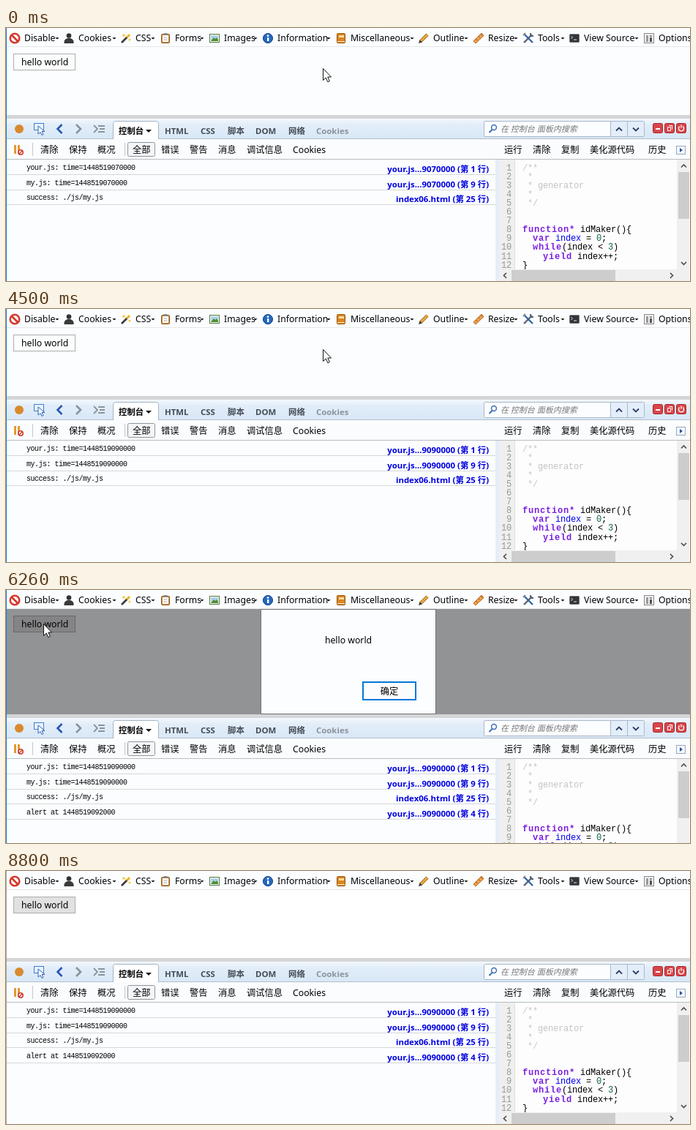
These frames come from a looping animation (935 px wide and 346 px high, 8.9 s). An HTML page:

```html
<!DOCTYPE html>
<html lang="zh">
<head>
<meta charset="utf-8">
<title>Console demo</title>
<style>
html, body { margin: 0; width: 100%; height: 100%; overflow: hidden; background: #fff; }
svg { display: block; width: 935px; height: 346px; }
text { font: 12.25px "Noto Sans", "Noto Sans CJK SC", "Noto Sans CJK", sans-serif; fill: #000; white-space: pre; }
.tab { font-size: 11.4px; font-weight: 700; fill: #454c56; }
.link { font-size: 11.4px; font-weight: 700; fill: #0000e0; text-anchor: end; }
.hint { font-size: 11px; font-style: italic; fill: #777; }
.log { font: 10px "Liberation Mono", monospace; letter-spacing: -.5px; }
.code, .num { font: 12px "Liberation Mono", monospace; letter-spacing: -.2px; }
.num { fill: #999; text-anchor: end; }
.com { fill: #c4c4c4; }
.key { font-weight: 700; letter-spacing: .8px; fill: #7a1fe0; }
.def { fill: #0000f0; }
.lit { fill: #116644; }
.mid { text-anchor: middle; }
</style>
</head>
<body>
<svg id="stage" viewBox="0 0 935 346"></svg>
<script>
const LOOP = 8900;
const PANEL_SHIFT = 51;

const rect = (x, y, w, h, fill, more = '') =>
  `<rect x="${x}" y="${y}" width="${w}" height="${h}" fill="${fill}" ${more}/>`;
const frame = (x, y, w, h, fill, stroke, rx = 0) =>
  rect(x + .5, y + .5, w - 1, h - 1, fill, `stroke="${stroke}" rx="${rx}"`);
const path = (d, fill, stroke = 'none', width = 1) =>
  `<path d="${d}" fill="${fill}" stroke="${stroke}" stroke-width="${width}"/>`;
const line = (d, stroke, width = 1) => path(d, 'none', stroke, width);
const circle = (x, y, r, fill, stroke = 'none', width = 1) =>
  `<circle cx="${x}" cy="${y}" r="${r}" fill="${fill}" stroke="${stroke}" stroke-width="${width}"/>`;
const text = (x, y, s, cls = '', more = '') =>
  `<text x="${x}" y="${y}" class="${cls}" ${more}>${s.replace(/</g, '&lt;')}</text>`;
const group = (id, body) => `<g id="${id}">${body}</g>`;
const at = (x, y, body) => `<g transform="translate(${x} ${y})">${body}</g>`;
const down = (x, y, r, fill) => path(`M${x - r} ${y}h${2 * r}l${-r} ${r}z`, fill);

// Menu icons, drawn around their own centre
const pencil = (body, tip) =>
  line('M-4 4L5 -5', '#8a5a18', 4.5) + line('M-4 4L5 -5', body, 2.8) + path('M-7 7l1.5-5 3.500 3.500z', tip);
const icons = {
  disable: circle(0, 0, 6.3, '#fff', '#d3392b', 2.6) + line('M-4.500 -4.500L4.500 4.500', '#d3392b', 2.6),
  person: circle(0, -3.500, 3.300, '#333') + path('M-6.500 7V4.500Q-6 1 -2 0h4Q6 1 6.500 4.500V7z', '#3a3a3a'),
  wand: line('M-6 6L2 -2', '#3b3b3b', 2.6) + line('M1 -1L5 -5', '#e8b520', 3) +
    circle(-3, -4, 1.8, '#f3c93c') + circle(5, 2, 1.5, '#f3c93c'),
  form: frame(-6, -6, 12, 13, '#d08a3c', '#8e5a22', 1) + rect(-4, -4, 8, 9, '#fff') +
    rect(-2.500, -7, 5, 3, '#888') + line('M-2.500 -1h5M-2.500 2h5', '#aaa'),
  image: frame(-7, -6, 14, 12, '#fff', '#56743a') + rect(-5, -4, 10, 8, '#a9d3ea') +
    path('M-5 4l4-5 2 2 2-2 2 3v2z', '#4b8c2d'),
  info: circle(0, 0, 6.6, '#2467bd', '#174b91') + rect(-1, -1, 2.4, 5, '#fff') + circle(0, -3.400, 1.4, '#fff'),
  book: frame(-6, -7, 12, 14, '#d98520', '#9a5510', 1) + rect(-3, -4, 7, 3, '#f8dba0') + line('M-5 4.500h10', '#fff0cc'),
  pencil: pencil('#f2a93b', '#3c3c3c'),
  ruler: path('M-7 4L4 -7L7 -3.500L-4 7z', '#eca24e', '#b5651d') + line('M-3.500 1l2 2M0 -2.500l2 2M3 -5.500l2 2', '#8a4b12'),
  tools: line('M-6 6L5 -5', '#5b6674', 2.4) + line('M-6 -6L6 6', '#3566a8', 2.4) +
    line('M3 -7v4h4', '#5b6674', 2) + line('M-7 -4l3-3', '#888', 2),
  screen: frame(-7, -6, 14, 12, '#30363c', '#777', 1) + line('M-4.500 -3l2 2 -2 2M-1 2h4', '#e5e5e5'),
  options: frame(-7, -7, 14, 14, '#f0f0f0', '#888') + rect(-4, -4, 3, 9, '#9a9a9a') +
    rect(1, -1, 3, 6, '#555') + rect(1, -4, 3, 2, '#888')
};
const menu = [
  ['Disable', 25, 70, 'disable'], ['Cookies', 99, 148, 'person'], ['CSS', 177, 201, 'wand'],
  ['Forms', 231, 268, 'form'], ['Images', 298, 341, 'image'], ['Information', 371, 441, 'info'],
  ['Miscellaneous', 471, 555, 'book'], ['Outline', 584, 629, 'pencil'], ['Resize', 659, 697, 'ruler'],
  ['Tools', 727, 761, 'tools'], ['View Source', 790, 862, 'screen'], ['Options', 892, 945, 'options']
];

function menuBar() {
  return rect(0, 0, 935, 26, '#fcfdff') + rect(0, 25, 935, 1, '#e4e6e8') +
    menu.map(([label, x, arrow, icon]) =>
      at(x - 13, 14, icons[icon]) + text(x, 18, label) + down(arrow, 13, 2.5, '#111')).join('');
}

function tabBar() {
  const tabs = [['HTML', 217], ['CSS', 266], ['脚本', 303], ['DOM', 341], ['网络', 386]];
  const red = x => frame(x, 130, 14, 14, '#d9464a', '#a8262c', 2);
  return rect(0, 119, 935, 5, '#d4d5d7') + rect(0, 124, 935, 28, 'url(#bar)') + rect(0, 151, 935, 1, '#b4c0cc') +
    circle(18, 138, 6, '#d98a2e') +
    frame(38, 130, 14, 10, '#e8f2fd', '#3f7fd0') +
    path('M44 134v11l3-2.500 2 4 2-1-2-4h4z', '#fff', '#2a62b8') +
    line('M76.500 132l-6 6 6 6', '#2858b4', 2.6) + line('M96 132l6 6-6 6', '#8b929a', 2.6) +
    line('M120 133l5 5-5 5M126 134h9M128 138h7M126 142h9', '#8b929a', 1.8) +
    path('M146.500 152V130.500q0-3 3-3h56q3 0 3 3V152', '#fff', '#a5b5c6') +
    text(154, 145, '控制台', 'tab', 'style="fill:#000"') + down(195, 139, 4, '#111') +
    tabs.map(([s, x]) => text(x, 145, s, 'tab')).join('') +
    text(424, 145, 'Cookies', 'tab', 'style="fill:#8b939c"') +
    frame(653, 127, 220, 22, '#fbfdff', '#a9b8c8', 1) +
    rect(827, 128, 45, 20, '#e3eefa') + rect(826, 128, 1, 20, '#a9b8c8') + rect(849, 128, 1, 20, '#a9b8c8') +
    circle(667, 136, 3.4, '#fff', '#3d6fb4', 1.5) + line('M664.500 139l-4 4', '#3d6fb4', 2) +
    text(676, 142, '在 控制台 面板内搜索', 'hint') +
    line('M834 140.500l4-4 4 4M857 136.500l4 4 4-4', '#2c3f66', 1.8) +
    red(884) + red(900) + red(916) +
    rect(888, 137, 6, 2, '#fff') + line('M904.500 135.500h4v5h-4zM906.500 133.500h4v5', '#fff') +
    line('M920.800 134.500a3.600 3.600 0 1 0 4.400 0M923 132.500v4', '#fff', 1.3);
}

function toolBar() {
  const items = [['清除', 47], ['保持', 86], ['概况', 125], ['全部', 173], ['错误', 212], ['警告', 251],
    ['消息', 290], ['调试信息', 329], ['Cookies', 392], ['运行', 681], ['清除', 720], ['复制', 759],
    ['美化源代码', 798], ['历史', 878]];
  return rect(0, 152, 935, 27, '#fafcfe') + rect(0, 179, 935, 1, '#b9bdc2') +
    rect(11, 160, 3, 12, '#e39a32') + rect(16, 160, 3, 12, '#e39a32') +
    circle(20, 170, 3.2, '#fff', '#d33a2d', 1.6) + line('M18 172l4-4', '#d33a2d', 1.4) +
    rect(36, 157, 1, 18, '#c4c8cc') + rect(162, 157, 1, 18, '#c4c8cc') +
    frame(166, 156, 38, 20, '#f3f5f8', '#8f969d', 2) +
    items.map(([s, x]) => text(x, 170.5, s)).join('') +
    frame(916, 161, 13, 12, '#f4f8fd', '#9aa8ba') + path('M921 164l4 3-4 3z', '#2450a8');
}

function logRow(i, msg, link) {
  const y = Math.round(20.6 * i);
  return text(28, 194 + y, msg, 'log') + text(660, 196.5 + y, link, 'link') + rect(1, 200 + y, 668, 1, '#d8d8d8');
}

function logs(stamp) {
  return logRow(0, `your.js: time=144851${stamp}`, `your.js...${stamp} (第 1 行)`) +
    logRow(1, `my.js: time=144851${stamp}`, `your.js...${stamp} (第 9 行)`) +
    logRow(2, 'success: ./js/my.js', 'index06.html (第 25 行)');
}

function editor() {
  const c = (s, cls) => `<tspan class="${cls}">${s}</tspan>`;
  const code = [c('/**', 'com'), c(' *', 'com'), c(' * generator', 'com'), c(' *', 'com'), c(' */', 'com'), '', '',
    c('function*', 'key') + ' idMaker(){',
    '  ' + c('var', 'key') + c(' index', 'def') + ' = ' + c('0', 'lit') + ';',
    '  ' + c('while', 'key') + '(index &lt; ' + c('3', 'lit') + ')',
    '    ' + c('yield', 'key') + ' index++;', '}'];
  const rows = code.map((s, i) => {
    const y = 194.5 + 12.1 * i;
    return text(691, y, String(i + 1), 'num') + `<text x="706" y="${y}" class="code">${s}</text>`;
  });
  return rect(674, 180, 261, 166, '#fdfdfe') + rect(674, 180, 21, 150, '#efefef') + rect(695, 180, 1, 150, '#dedede') +
    rows.join('') +
    rect(917, 180, 17, 166, '#f0f0f0') + rect(919, 197, 15, 64, '#cdcdcd') +
    rect(674, 330, 260, 16, '#f0f0f0') + rect(691, 331, 142, 15, '#cdcdcd') +
    line('M923 190.500l3.500-3.500 3.500 3.500M923 320l3.500 3.500 3.500-3.500M684 335l-3.500 3.500 3.500 3.500M908 335l3.500 3.500-3.500 3.500', '#505050', 1.7);
}

function panel() {
  return tabBar() + toolBar() + rect(0, 180, 669, 166, '#fbfdff') + rect(669, 180, 5, 166, '#e4eef8') +
    group('oldLogs', logs('9070000')) + group('newLogs', logs('9090000')) +
    group('alertLog', logRow(3, 'alert at 1448519092000', 'your.js...9090000 (第 4 行)')) +
    group('editor', editor()) +
    group('blank', rect(0, 180, 669, 166, '#f0f0f0') + rect(674, 180, 14, 166, '#efefef') +
      rect(688, 180, 1, 166, '#dcdfe2') + rect(689, 180, 246, 166, '#fff') + text(683, 194.5, '1', 'num'));
}

const stage = document.getElementById('stage');
stage.innerHTML =
  '<defs><linearGradient id="bar" x2="0" y2="1"><stop stop-color="#f3f8fd"/><stop offset=".3" stop-color="#e2edf9"/>' +
  '<stop offset="1" stop-color="#d8e8f7"/></linearGradient></defs>' +
  '<rect id="page" y="26" width="935" height="145"/>' +
  '<rect id="button"/>' + text(21, 51, 'hello world', '', 'id="label"') +
  group('dialog', frame(348, 26, 240, 144, '#fbfdff', '#6f7072') + text(468, 73, 'hello world', 'mid') +
    '<rect id="ok"/>' + text(524, 142.5, '确定', 'mid')) +
  menuBar() + group('panel', panel()) +
  '<rect id="edge" width="1" height="346"/>' +
  group('cursor', path('M.5 .5V16.500L4.300 13L6.800 18.700L9.300 17.600L6.800 12H11.500z', '#fff', '#111'));

const el = id => document.getElementById(id);
const show = (id, on) => el(id).setAttribute('display', on ? 'inline' : 'none');

function box(id, x, y, w, h, [fill, stroke, width]) {
  const set = { x: x + width / 2, y: y + width / 2, width: w - width, height: h - width,
    fill, stroke, 'stroke-width': width };
  for (const k in set) el(id).setAttribute(k, set[k]);
}

// Pointer samples: time, x, y
const trail = [[0, 433, 55], [5190, 281, 51], [5310, 216, 54], [5460, 145, 52], [5580, 97, 50], [5710, 66, 47],
  [5830, 51, 46], [6410, 160, 92], [6540, 331, 165], [6690, 602, 270], [6810, 582, 202], [6960, 562, 176],
  [7080, 550, 160], [7210, 544, 152], [7360, 537, 141], [7640, 548, 146], [7770, 615, 188], [7920, 811, 245],
  [8070, 870, 304], [8190, 899, 343], [8340, 960, 400]];
const buttonLooks = [[0, '#fcfdfd', '#adadad', 1], [5710, '#e5f1fb', '#0078d7', 1], [6110, '#cce4f7', '#005499', 1],
  [6260, '#848486', '#69696a', 1], [7640, '#e1e1e1', '#0078d7', 2], [8800, '#e1e1e1', '#adadad', 1]];
const current = (list, t) => list.filter(k => k[0] <= t).pop().slice(1);

function draw(t) {
  const alerting = t >= 6260 && t < 7640;
  const pressed = t >= 6110 && t < 6260;
  el('page').setAttribute('fill', alerting ? '#929395' : t < 7640 ? '#fbfdff' : '#fff');
  box('button', 10, 35, 85, 23, current(buttonLooks, t));
  el('label').setAttribute('x', pressed ? 22 : 21);
  box('ok', 487, 125, 74, 26, t >= 7360 ? ['#cce4f7', '#005499', 1] : ['#fbfcfe', '#0078d7', 2]);
  show('dialog', alerting);
  el('panel').setAttribute('transform', `translate(0 ${alerting ? PANEL_SHIFT : 0})`);
  show('oldLogs', t < 2560);
  show('editor', t < 2560 || t >= 2710);
  show('blank', t >= 2560 && t < 2710);
  show('newLogs', t >= 4500);
  show('alertLog', t >= 6260);
  el('edge').setAttribute('fill', t < 8800 ? '#1a7ed6' : '#a8a8a8');
  const [x, y] = current(trail, t);
  el('cursor').setAttribute('transform', `translate(${x} ${y})`);
}

const start = performance.now();
function tick() {
  draw((performance.now() - start) % LOOP);
  requestAnimationFrame(tick);
}
tick();
</script>
</body>
</html>
```
